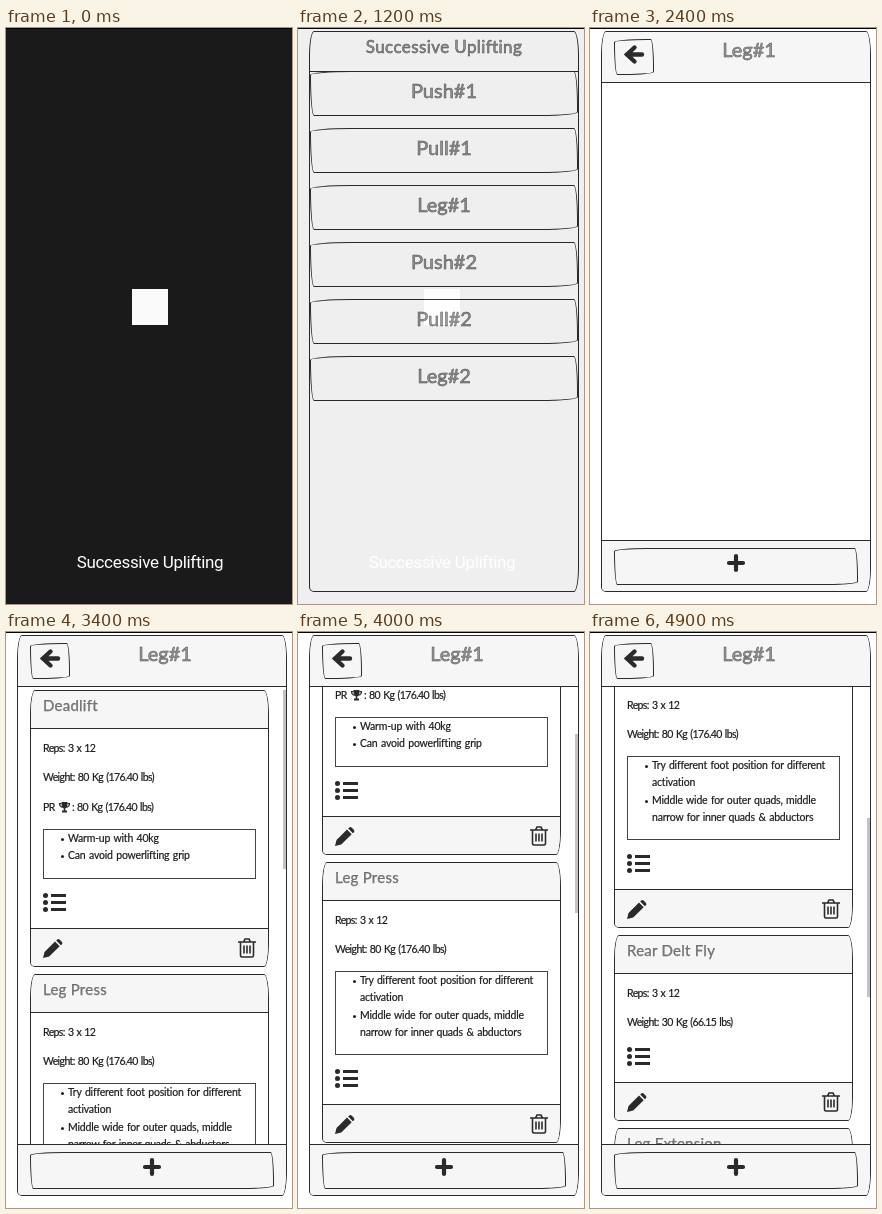
Recreate the animation shown at these times as an HTML page. Size 286 by 576 pixels, loop 5000 ms.

```html
<!DOCTYPE html>
<html lang="en">
<head>
<meta charset="utf-8">
<style>
html, body { margin: 0; width: 100%; height: 100%; overflow: hidden; background: #1a1a1a; }
div, svg { position: absolute; box-sizing: border-box; white-space: pre; }
svg { overflow: visible; }
#stage { left: 0; top: 0; width: 286px; height: 576px; overflow: hidden; background: #1a1a1a; }
#brand { left: 0; width: 288px; top: 522px; text-align: center; color: #fff;
  font: 17px/24px Roboto, sans-serif; letter-spacing: -.3px; }
.page { left: 0; top: 0; width: 286px; height: 576px; background: #fff; }
.frame { left: 11px; top: 3px; width: 270px; height: 561px; overflow: hidden; }
.frame, .card { border: 1px solid #2a2a2a; border-radius: 5px 5px 5px 5px / 25px 25px 25px 5px; }
.card { left: 12px; width: 239px; overflow: hidden; background: #fff; }
.btn { border: 1px solid #2a2a2a; border-radius: 255px 25px 225px 25px / 25px 225px 25px 255px; }
.bar { left: 0; width: 100%; background: #f6f6f6; }
.top { top: 0; border-bottom: 1px solid #2a2a2a; }
.foot { bottom: 0; border-top: 1px solid #2a2a2a; }
.head { font: 20px/24px Lato, sans-serif; color: #999; -webkit-text-stroke: .5px #4a4a4a; text-align: center; }
.name { font: 15px/20px Lato, sans-serif; letter-spacing: .25px; color: #777; -webkit-text-stroke: .25px #555; }
.txt { font: 10.5px/20px Lato, sans-serif; letter-spacing: -.6px; word-spacing: 1px; color: #1c1c1c;
  -webkit-text-stroke: .2px #1c1c1c; }
.note { letter-spacing: -.2px; }
.dot { left: 30px; width: 3px; height: 3px; border-radius: 50%; background: #222; }
.notes { left: 12px; width: 213px; border: 1px solid #444; }
#view { left: 0; top: 51px; width: 268px; height: 457px; overflow: hidden; }
#thumb { left: 265px; width: 3px; height: 179px; background: #c2c2c2; }
</style>
</head>
<body>
<div id="stage">
  <div style="left:126px;top:261px;width:36px;height:36px;background:#fafafa"></div>
  <div id="brand">Successive Uplifting</div>
  <div class="page" id="menu"></div>
  <div class="page" id="detail"></div>
  <div style="left:0;top:0;width:286px;height:1px;background:#000"></div>
</div>
<script>
const $ = id => document.getElementById(id);
const box = (cls, style, html = '') => `<div class="${cls}" style="${style}">${html}</div>`;
const text = (cls, x, mid, s) => box(cls, `left:${x}px;top:${mid - 11}px`, s);
const line = (d, w, cap = 'butt') =>
  `<path d="${d}" fill="none" stroke="#2a2a2a" stroke-width="${w}" stroke-linecap="${cap}"/>`;
const fill = d => `<path d="${d}" fill="#2a2a2a"/>`;

const icons = {
  back: line('M18 9.5H3M10.5 2.5L3 9.5L10.5 16.5', 4.4, 'round'),
  plus: line('M9 2V16M2 9H16', 4.2, 'round'),
  list: line('M2.5 2.5h.01M2.5 9.5h.01M2.5 16.5h.01', 5, 'round') + line('M8 2.5h15M8 9.5h15M8 16.5h15', 3),
  pencil: fill('M0 19l1.5-6L12 2.5l4.7 4.7L6.2 17.5zM13.2 1.4l1-1q1.2-.8 2.4 .2l2.4 2.4q.8 1.2 0 2.2l-1.1 1z'),
  trash: line('M0 4h18M5.5 4l1.5-3h4l1.5 3M2.5 4v13.5q0 1.5 1.5 1.5h10q1.5 0 1.5-1.5V4M6 7.5v8M9 7.5v8M12 7.5v8', 1.6),
  cup: fill('M2.5 0h6v3q0 3-2.2 3.6v2h1.7v1.9H3V8.6h1.7v-2Q2.5 6 2.5 3z') +
    line('M2.5 1.5H.5q0 3 3 4M8.5 1.5h2q0 3-3 4', 1.2)
};
const icon = (name, x, y) => `<svg width="24" height="20" style="left:${x}px;top:${y}px">${icons[name]}</svg>`;

// Stacks an exercise card below the previous one.
let nextTop = 10;
function card(title, weight, record, notes) {
  let html = box('bar top', 'height:38px') + text('name', 12, 15, title) +
    text('txt', 12, 58, 'Reps: 3 x 12') + text('txt', 12, 87, 'Weight: ' + weight);
  let y = 87;
  if (record) {
    y = 117;
    html += text('txt', 12, y, 'PR') + icon('cup', 28, y - 6) + text('txt', 41, y, ': ' + weight);
  }
  if (notes) {
    const h = Math.floor(notes.length * 17.3 + 15.5);
    y += 21;
    html += box('notes', `top:${y}px;height:${h}px`);
    notes.forEach((s, i) => {
      const mid = y + 10 + 17.4 * i;
      if (s[0] == '*') html += box('dot', `top:${mid - 1}px`);
      html += text('txt note', 37, mid, s.replace('*', ''));
    });
    y += h - 10;
  }
  y += 33;
  const h = y + 66;
  html += icon('list', 12, y - 9) + box('bar foot', 'height:38px') +
    icon('pencil', 12, h - 29) + icon('trash', 207, h - 30);
  const out = box('card', `top:${nextTop}px;height:${h}px`, html);
  nextTop += h + 7;
  return out;
}

const days = ['Push#1', 'Pull#1', 'Leg#1', 'Push#2', 'Pull#2', 'Leg#2'];
$('menu').innerHTML = box('frame', '',
  box('top', 'left:0;width:100%;height:40px') +
  box('head', 'left:0;width:268px;top:3px;font-size:17px;letter-spacing:.4px', 'Successive Uplifting') +
  days.map((d, i) => box('btn', `left:0;width:268px;top:${39 + 57 * i}px;height:45px`,
    box('head', 'left:0;width:266px;top:6px', d))).join(''));

$('detail').innerHTML = box('frame', '',
  box('bar top', 'height:51px') +
  box('btn', 'left:12px;top:7px;width:40px;height:36px') + icon('back', 22, 13) +
  box('head', 'left:97px;width:100px;top:5px', 'Leg#1') +
  `<div id="view"><div id="cards" style="left:0;top:0;width:268px">` +
  card('Deadlift', '80 Kg (176.40 lbs)', true, ['*Warm-up with 40kg', '*Can avoid powerlifting grip']) +
  card('Leg Press', '80 Kg (176.40 lbs)', false, ['*Try different foot position for different', 'activation',
    '*Middle wide for outer quads, middle', 'narrow for inner quads &amp; abductors']) +
  card('Rear Delt Fly', '30 Kg (66.15 lbs)') +
  card('Leg Extension', '30 Kg (66.15 lbs)') +
  '</div><div id="thumb"></div></div>' +
  box('bar foot', 'height:51px', box('btn', 'left:12px;top:7px;width:244px;height:37px') + icon('plus', 125, 13)));

const part = (t, a, b) => Math.min(1, Math.max(0, (t - a) / (b - a)));
const smooth = p => p * p * (3 - 2 * p);
const ease = p => p < .5 ? 4 * p ** 3 : 1 - 4 * (1 - p) ** 3;
// Three swipes: [start, end, distance]
const swipes = [[3265, 3800, 109], [3850, 4400, 125], [4650, 4900, 100]];

function draw(now) {
  const t = Math.floor(now % 5000 / 100) * 100;
  const scroll = swipes.reduce((sum, [a, b, d]) => sum + d * ease(part(t, a, b)), 0);
  $('menu').style.opacity = smooth(part(t, 960, 1245));
  $('detail').style.display = t < 2400 ? 'none' : 'block';
  $('cards').style.display = $('thumb').style.display = t < 2500 ? 'none' : 'block';
  $('cards').style.top = -Math.round(scroll) + 'px';
  $('thumb').style.top = Math.round(scroll * .392) + 'px';
}
const start = performance.now();
function tick() {
  draw(performance.now() - start);
  requestAnimationFrame(tick);
}
tick();
</script>
</body>
</html>
```
